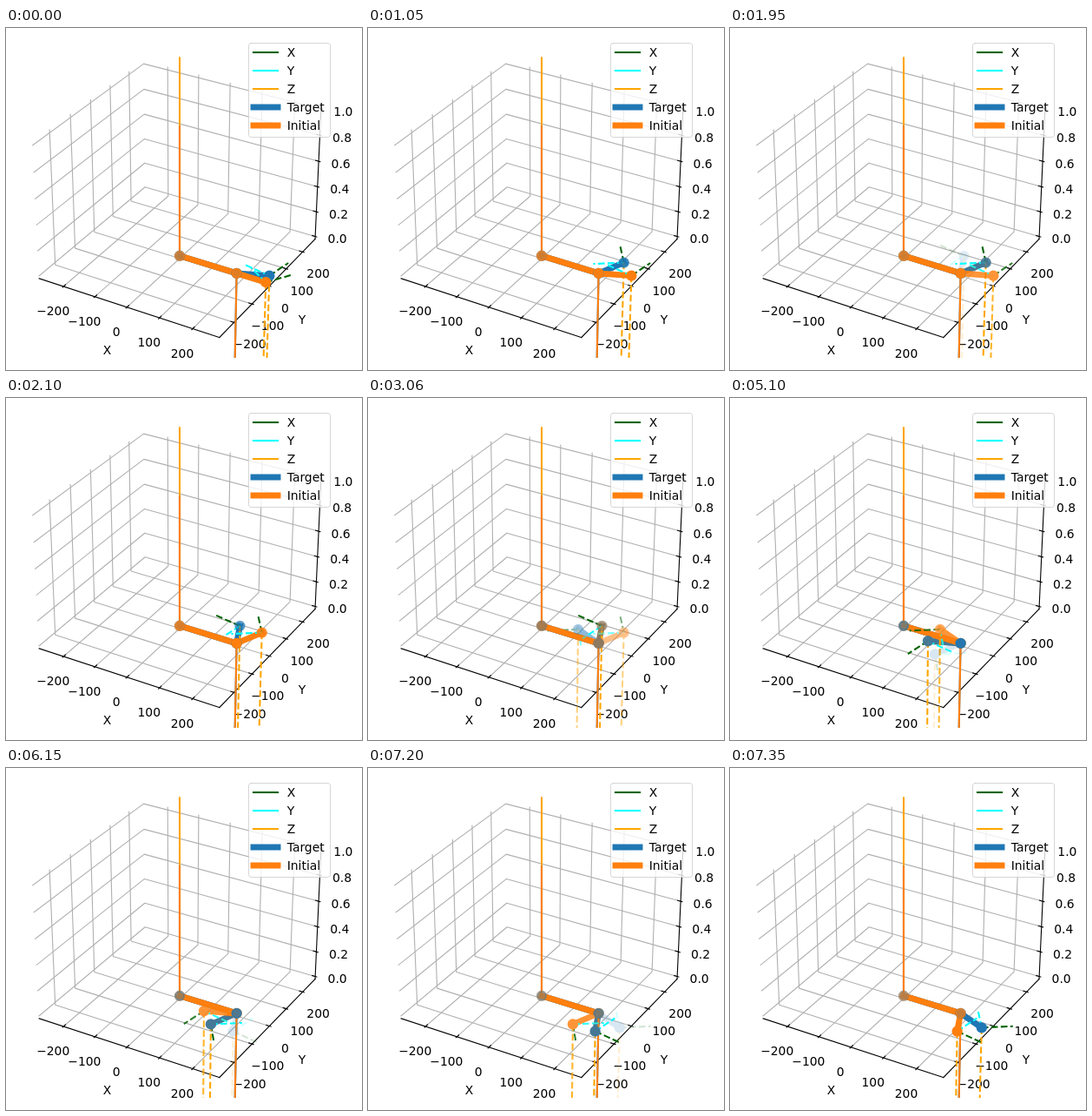
Write an HTML page with a canvas that moves like this. It is 410 px wide and 393 px high and loops after 8000 ms.

```html
<!DOCTYPE html>
<html lang="en">
<head>
<meta charset="utf-8">
<title>Two-link arm stepping round its elbow</title>
<style>
  html, body { margin: 0; width: 100%; height: 100%; overflow: hidden; background: #fff; }
  canvas { display: block; }
</style>
</head>
<body>
<canvas id="stage" width="410" height="393"></canvas>
<script>
const WIDTH = 410, HEIGHT = 393;
const LOOP = 8000, PERIOD = 1050, HOLD = 900, FADE_STEP = 30, FADE_STEPS = 6;
const STATES = 8;
const BLUE = '#1f77b4', ORANGE = '#ff7f0e';
const X_COLOR = '#006400', Y_COLOR = '#00ffff', Z_COLOR = '#ffa500';
const THIN = 1.11, LINE = 2.08, THICK = 6.94;
const DASH = [7.7, 3.33];

// Box coordinates: x and y run over ±SIDE, z over ±TALL; the floor is z = 0 in data units.
const SIDE = 0.5952, TALL = 0.4464, UNIT = 0.002133;
const LINK_1 = 0.381, LINK_2 = 0.1905, AXIS = 0.18, AXIS_TURN = 57, AXIS_DROP = -84;
const SCALE = 1997.8, CENTRE = { x: 200, y: 189.2 };
const height = z => (z - 0.5) * 0.8571;
const rad = degrees => degrees * Math.PI / 180;

// Perspective camera, elevation 30°, azimuth -60°, distance 10.
function project([x, y, z]) {
  const right = 0.866 * x + 0.5 * y;
  const up = -0.25 * x + 0.433 * y + 0.866 * z;
  const distance = 10 - (0.433 * x - 0.75 * y + 0.5 * z);
  return {
    x: CENTRE.x + right / distance * SCALE,
    y: CENTRE.y - up / distance * SCALE,
    depth: -10 / distance * SCALE
  };
}

function stroke(ctx, points, color, width, dash = []) {
  ctx.beginPath();
  for (const p of points) ctx.lineTo(p.x, p.y);
  ctx.strokeStyle = color;
  ctx.lineWidth = width;
  ctx.lineCap = dash.length ? 'butt' : 'square';
  ctx.lineJoin = 'round';
  ctx.setLineDash(dash);
  ctx.stroke();
}

const line3d = (ctx, points, ...style) => stroke(ctx, points.map(project), ...style);

function label(ctx, text, x, y, align = 'center') {
  ctx.fillStyle = '#000';
  ctx.font = '13.89px "DejaVu Sans", sans-serif';
  ctx.textAlign = align;
  ctx.fillText(text, x, y + 5);
}

function drawAxes(ctx) {
  const ticks = [-200, -100, 0, 100, 200];
  const levels = [0, 0.2, 0.4, 0.6, 0.8, 1];
  const grid = points => line3d(ctx, points, '#b0b0b0', THIN);
  const spine = points => line3d(ctx, points, '#000', THIN);
  const name = value => String(value).replace('-', '\u2212');
  const tickLabel = (text, at, dx, dy) => {
    const p = project(at);
    label(ctx, text, p.x + dx, p.y + dy);
  };

  for (const value of ticks) {
    const t = value * UNIT;
    grid([[t, -SIDE, -TALL], [t, SIDE, -TALL], [t, SIDE, TALL]]);
    grid([[SIDE, t, -TALL], [-SIDE, t, -TALL], [-SIDE, t, TALL]]);
  }
  for (const value of levels) {
    const z = height(value);
    grid([[-SIDE, -SIDE, z], [-SIDE, SIDE, z], [SIDE, SIDE, z]]);
  }

  spine([[-SIDE, -SIDE, -TALL], [SIDE, -SIDE, -TALL]]);
  spine([[SIDE, -SIDE, -TALL], [SIDE, SIDE, -TALL]]);
  spine([[SIDE, SIDE, -TALL], [SIDE, SIDE, TALL]]);

  const outer = SIDE + 0.01, inner = SIDE - 0.02;
  for (const value of ticks) {
    const t = value * UNIT;
    spine([[t, -outer, -TALL], [t, -inner, -TALL]]);
    spine([[outer, t, -TALL], [inner, t, -TALL]]);
    tickLabel(name(value), [t, -SIDE, -TALL], -12, 28);
    tickLabel(name(value), [SIDE, t, -TALL], 18, 25);
  }
  for (const value of levels) {
    const z = height(value);
    spine([[outer, SIDE, z], [inner, SIDE, z]]);
    tickLabel(value.toFixed(1), [SIDE, SIDE, z], 25.5, 2.5);
  }
  label(ctx, 'X', 116.5, 369.5);
  label(ctx, 'Y', 341, 335);
}

function armAt(degrees, color) {
  const floor = height(0);
  const polar = ([x, y], length, angle) =>
    [x + length * Math.cos(rad(angle)), y + length * Math.sin(rad(angle)), floor];
  const elbow = [LINK_1, 0, floor];
  const tip = polar(elbow, LINK_2, degrees);
  return {
    color,
    joints: [[0, 0, floor], elbow, tip],
    xEnd: polar(tip, AXIS, degrees + AXIS_TURN),
    yEnd: polar(tip, AXIS, degrees + AXIS_TURN + 90),
    zEnd: [tip[0], tip[1], height(AXIS_DROP)]
  };
}

function drawArm(ctx, { color, joints, xEnd, yEnd, zEnd }) {
  const [base, elbow, tip] = joints;
  line3d(ctx, joints, color, THICK);
  line3d(ctx, [base, [0, 0, height(1)]], color, LINE);
  line3d(ctx, [elbow, [LINK_1, 0, height(-1)]], color, LINE);
  line3d(ctx, [tip, xEnd], X_COLOR, LINE, DASH);
  line3d(ctx, [tip, yEnd], Y_COLOR, LINE, DASH);
  line3d(ctx, [tip, zEnd], Z_COLOR, LINE, DASH);
}

// Joints fade with their distance behind the nearest one.
function drawJoints(ctx, { color, joints }) {
  const points = joints.map(project);
  const range = key => {
    const values = points.map(p => p[key]);
    return Math.max(...values) - Math.min(...values);
  };
  const spread = Math.hypot(range('x'), range('y'), range('depth'));
  const nearest = Math.min(...points.map(p => p.depth));
  ctx.setLineDash([]);
  ctx.fillStyle = ctx.strokeStyle = color;
  ctx.lineWidth = LINE;
  for (const p of points) {
    ctx.globalAlpha = Math.max(0.3, 1 - (p.depth - nearest) / spread);
    ctx.beginPath();
    ctx.arc(p.x, p.y, 5.15, 0, 2 * Math.PI);
    ctx.fill();
    ctx.stroke();
  }
  ctx.globalAlpha = 1;
}

function drawLegend(ctx) {
  ctx.globalAlpha = 0.8;
  ctx.beginPath();
  ctx.roundRect(279.5, 17.5, 94, 108, 2.8);
  ctx.fillStyle = '#fff';
  ctx.fill();
  ctx.setLineDash([]);
  ctx.strokeStyle = '#ccc';
  ctx.lineWidth = 1;
  ctx.stroke();
  ctx.globalAlpha = 1;
  const rows = [
    ['X', X_COLOR, LINE], ['Y', Y_COLOR, LINE], ['Z', Z_COLOR, LINE],
    ['Target', BLUE, THICK], ['Initial', ORANGE, THICK]
  ];
  rows.forEach(([text, color, width], i) => {
    const y = 28 + 21 * i;
    stroke(ctx, [{ x: 285, y }, { x: 313, y }], color, width);
    label(ctx, text, 323.7, y, 'left');
  });
}

function renderState(k) {
  const canvas = document.createElement('canvas');
  canvas.width = WIDTH;
  canvas.height = HEIGHT;
  const ctx = canvas.getContext('2d');
  ctx.fillStyle = '#fff';
  ctx.fillRect(0, 0, WIDTH, HEIGHT);
  drawAxes(ctx);

  const angle = 22.5 + 45 * k;
  const target = armAt(angle, BLUE);
  const initial = armAt(k ? angle - 45 : 0, ORANGE);
  ctx.save();
  ctx.beginPath();
  ctx.rect(10, 9.4, 370, 369.6);
  ctx.clip();
  line3d(ctx, [[0, 0, height(0)], [0, 0, height(1.5)]], Z_COLOR, LINE);
  drawArm(ctx, target);
  drawArm(ctx, initial);
  const targetInFront = k >= 3 && k <= 6;
  for (const arm of targetInFront ? [initial, target] : [target, initial]) drawJoints(ctx, arm);
  ctx.restore();

  drawLegend(ctx);
  return canvas;
}

const states = Array.from({ length: STATES }, (_, k) => renderState(k));
const stage = document.getElementById('stage').getContext('2d');
const start = performance.now();

function frame() {
  const time = (performance.now() - start) % LOOP;
  const k = Math.floor(time / PERIOD);
  const fadeTime = time - k * PERIOD - HOLD;
  stage.globalAlpha = 1;
  stage.drawImage(states[k], 0, 0);
  if (fadeTime >= 0 && k + 1 < STATES) {
    stage.globalAlpha = (Math.floor(fadeTime / FADE_STEP) + 1) / FADE_STEPS;
    stage.drawImage(states[k + 1], 0, 0);
  }
  requestAnimationFrame(frame);
}
frame();
</script>
</body>
</html>
```
